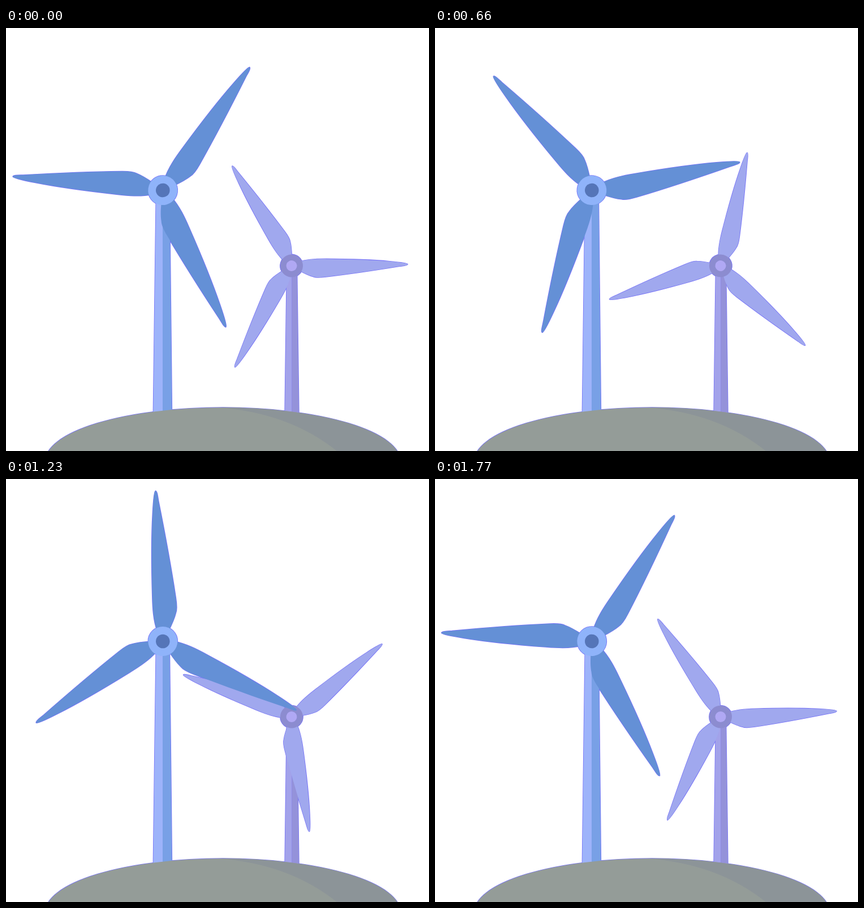
Write an HTML page with a canvas that moves like this. It is 748x748 px and loops after 1800 ms.

```html
<!DOCTYPE html>
<html lang="en">
<head>
<meta charset="utf-8">
<title>Wind turbines</title>
<style>
html, body { margin: 0; width: 100%; height: 100%; overflow: hidden; background: #fff; }
canvas { display: block; }
</style>
</head>
<body>
<canvas id="stage" width="748" height="748"></canvas>
<script>
const ctx = document.getElementById('stage').getContext('2d');
const LOOP = 1800, STEP = 30, RIM = '#7470f8';

// One blade pointing up, with the hub centre at the origin
const blade = new Path2D(`M-10-18 C-17-38-18-60-18.5-80 C-20-130-20-190-18-225
  C-17-245-15.5-266-13-266 C-10-266-9-256-7.6-248 C3-195 15-130 23-77
  C25-64 25-55 23-50 C20-38 16-30 10-18Z`);

const disc = r => {
  const p = new Path2D();
  p.arc(0, 0, r, 0, Math.PI * 2);
  return p;
};

const hill = new Path2D();
hill.ellipse(383.5, 766, 314, 95, 0, 0, Math.PI * 2);
const shade = new Path2D('M375 665 V671 Q500 680 585 748 H748 V665Z');

const turbines = [
  {
    x: 505, y: 420.5, scale: 0.771, start: -28,
    left: new Path2D('M496.5 425 H505.5 V690 H493Z'),
    right: new Path2D('M505.5 425 H514.5 L518 690 H505.5Z'),
    colors: { left: '#a2a2ea', right: '#9492da', blade: '#a0a8ee', hub: '#8c8cd0', core: '#b0a8f4' }
  },
  {
    x: 277.3, y: 287, scale: 1, start: -82,
    left: new Path2D('M265.3 300 H277 V690 H260.3Z'),
    right: new Path2D('M277 300 H289.3 L293.5 690 H277Z'),
    colors: { left: '#9db3fa', right: '#78a0e6', blade: '#6490d6', hub: '#8fb3fa', core: '#5575b8' }
  }
];
const hub = disc(26), core = disc(12.3);

function paint(path, color, rim) {
  if (rim) ctx.stroke(path);
  else {
    ctx.fillStyle = color;
    ctx.fill(path);
  }
}

function drawTurbine(t, turn, rim) {
  const c = t.colors;
  ctx.lineWidth = 1.6;
  paint(t.left, c.left, rim);
  paint(t.right, c.right, rim);
  ctx.save();
  ctx.translate(t.x, t.y);
  ctx.scale(t.scale, t.scale);
  ctx.lineWidth = 1.6 / t.scale;
  ctx.rotate((t.start + turn) * Math.PI / 180);
  for (let i = 0; i < 3; i++) {
    paint(blade, c.blade, rim);
    ctx.rotate(Math.PI * 2 / 3);
  }
  paint(hub, c.hub, rim);
  if (!rim) paint(core, c.core);
  ctx.restore();
}

function draw(time) {
  const turn = Math.floor(time % LOOP / STEP) * STEP / LOOP * 120;
  ctx.fillStyle = '#fff';
  ctx.fillRect(0, 0, 748, 748);
  ctx.strokeStyle = RIM;
  // Rims go below all fills, so they only show against the background
  for (const rim of [true, false]) {
    for (const t of turbines) drawTurbine(t, turn, rim);
    ctx.lineWidth = 1.6;
    paint(hill, '#949c98', rim);
  }
  ctx.save();
  ctx.clip(hill);
  paint(shade, '#8c9498');
  ctx.restore();
}

const begin = performance.now();
function tick() {
  draw(performance.now() - begin);
  requestAnimationFrame(tick);
}
tick();
</script>
</body>
</html>
```
